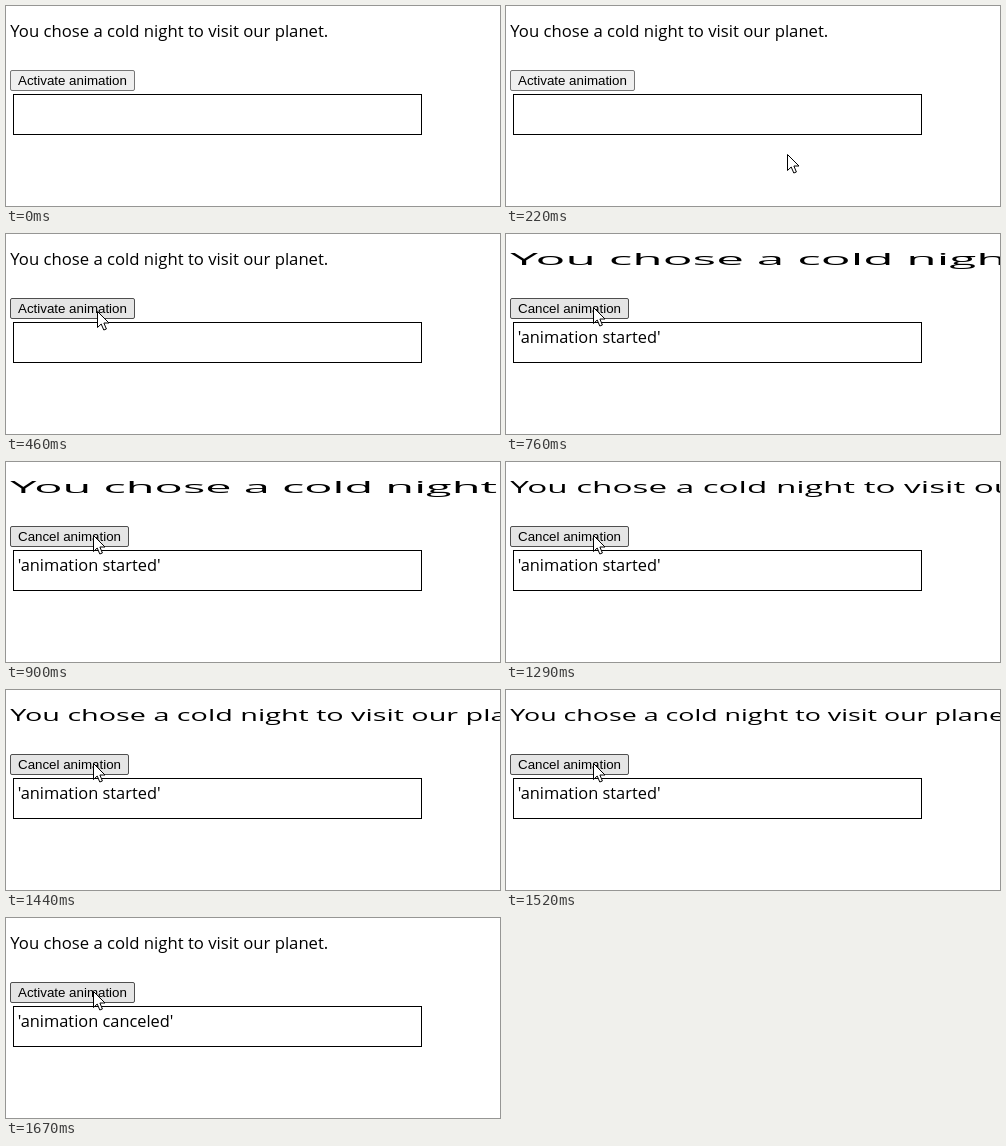
These frames come from a looping animation (494 px wide and 200 px high, 2.7 s). An HTML page:

```html
<!DOCTYPE html>
<html lang="en">
<head>
<meta charset="utf-8">
<title>Animation events</title>
<style>
  html, body { margin: 0; height: 100%; overflow: hidden; background: #fff; }
  svg { display: block; cursor: default; }
  text { font: 16.7px "Open Sans", "Noto Sans", sans-serif; }
  #log { font-size: 16.4px; }
  #label { font: 13.333px "Liberation Sans", Arial, sans-serif; }
</style>
</head>
<body>
<svg width="494" height="200" viewBox="0 0 494 200">
  <text id="message">You chose a cold night to visit our planet.</text>
  <rect id="button" x="4.5" y="64.5" height="20" rx="1.5"/>
  <text id="label" x="12" y="79"></text>
  <rect x="7.5" y="88.5" width="408" height="40" fill="none" stroke="#000"/>
  <text id="log" x="11.7" y="109"></text>
  <path id="pointer" d="M.5.5V16.5L4.2 13 6.8 19 9.4 18 6.9 12H12Z" fill="#fff" stroke="#000"/>
</svg>
<script>
const LOOP = 2700, CLICK = 690, CANCEL = 1590, LOGGED = 1670;
const START = 698, DURATION = 2000;
// The screen refreshes only at these moments (ms)
const TICKS = [0, 70, 150, 230, 300, 380, 460, 530, 610, 690, 760, 820, 900, 980,
  1060, 1140, 1210, 1290, 1370, 1440, 1520, 1590, 1670];

const [message, button, label, log, pointer] =
  ['message', 'button', 'label', 'log', 'pointer'].map(id => document.getElementById(id));

// CSS "ease": cubic-bezier(.25, .1, .25, 1), solved by bisection
function ease(x) {
  let low = 0, high = 1;
  for (let i = 0; i < 24; i++) {
    const u = (low + high) / 2;
    if (0.75 * u * (1 - u) + u ** 3 < x) low = u; else high = u;
  }
  const u = low, v = 1 - u;
  return 0.3 * u * v * v + 3 * u * u * v + u ** 3;
}

function pointerAt(t) {
  if (t >= 610) return [87, 73];
  if (t >= 530) return [89, 75];
  const rest = (1 - (t - 70) / 390) ** 2;
  return [Math.round(91 + 301 * rest), Math.round(77 + 113 * rest)];
}

function draw(t) {
  const active = t >= CLICK && t < CANCEL;
  const scale = active ? 3 - 2 * ease((t - START) / DURATION) : 1;
  message.setAttribute('transform', `translate(4.3 31) scale(${scale} 1)`);

  const [x, y] = pointerAt(t);
  pointer.setAttribute('transform', `translate(${x} ${y})`);
  pointer.setAttribute('visibility', t < 70 ? 'hidden' : 'visible');

  const hover = t >= 70 && x < 129 && y < 85;
  button.setAttribute('width', active ? 118 : 124);
  button.setAttribute('fill', hover ? '#e5e5e5' : '#efefef');
  button.setAttribute('stroke', hover ? '#4f4f4f' : '#767676');
  label.textContent = active ? 'Cancel animation' : 'Activate animation';
  log.textContent = active ? "'animation started'" : t >= LOGGED ? "'animation canceled'" : '';
}

const origin = performance.now();
function frame() {
  const t = (performance.now() - origin) % LOOP;
  draw(TICKS.findLast(tick => tick <= t));
  requestAnimationFrame(frame);
}
frame();
</script>
</body>
</html>
```
